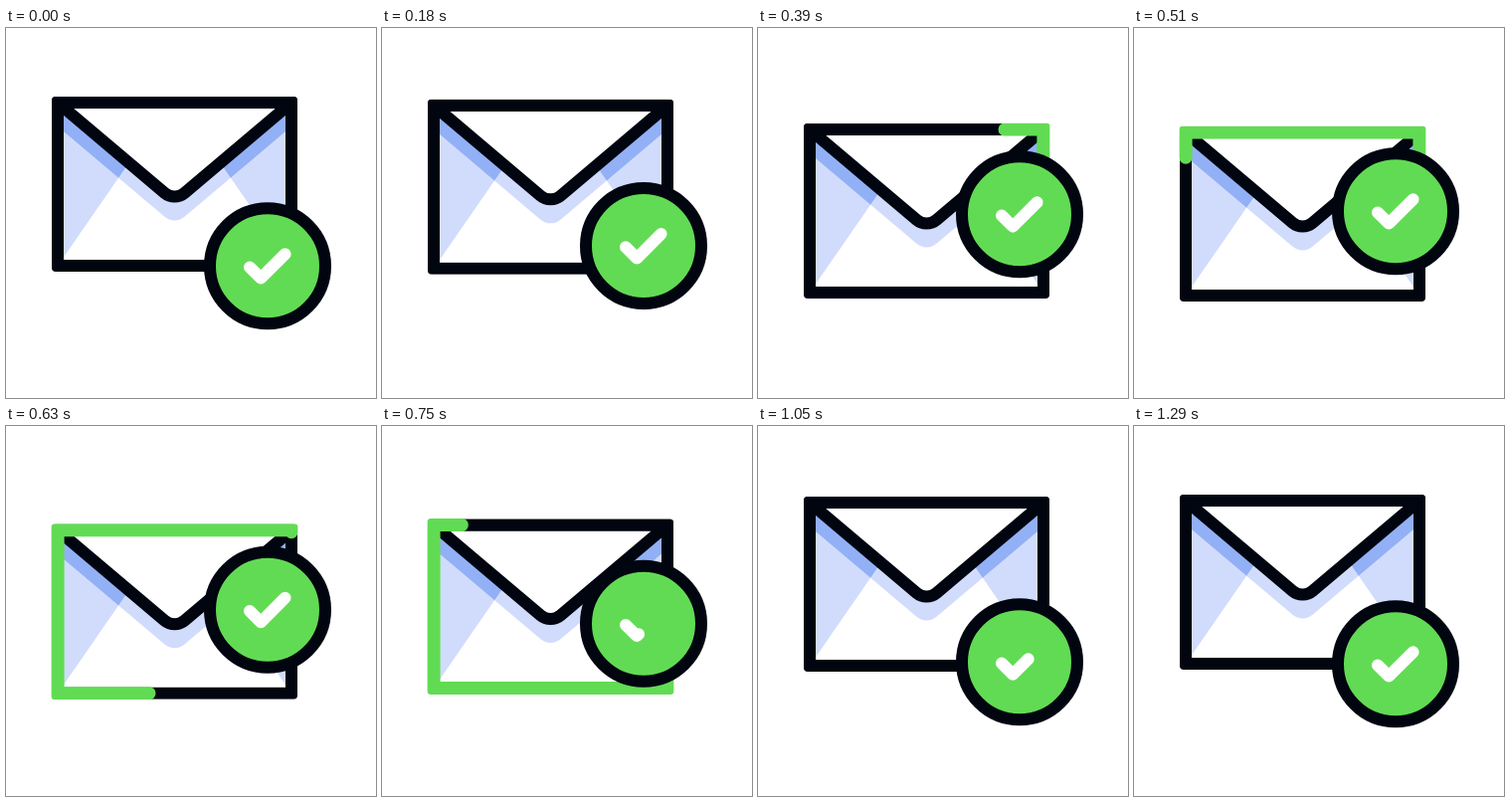
Animation of 372x372 px, one loop 1500 ms. Source, as an HTML page with a canvas:

```html
<!DOCTYPE html>
<html lang="en">
<head>
<meta charset="utf-8">
<title>Mail sent</title>
<style>
html, body { margin: 0; width: 100%; height: 100%; overflow: hidden; background: #fff; }
canvas { display: block; }
</style>
</head>
<body>
<canvas id="stage" width="372" height="372"></canvas>
<script>
const ctx = document.getElementById('stage').getContext('2d');
const LOOP = 1500, STEP = 30;
const INK = '#01050f', GREEN = '#62db54', PALE = '#d1dcfd', BLUE = '#92b0f6';
const LEFT = 52, RIGHT = 287, MID = 169.5, WIDTH = RIGHT - LEFT, HEIGHT = 164;
const PERIMETER = 2 * (WIDTH + HEIGHT);

const smooth = s => s * s * (3 - 2 * s);
const phase = (t, from, to) => Math.min(1, Math.max(0, (t - from) / (to - from)));

// Cubic bezier easing with handles (x1, 0) and (x2, 1)
function ease(p, x1, x2) {
  let lo = 0, hi = 1;
  for (let i = 0; i < 24; i++) {
    const s = (lo + hi) / 2, r = 1 - s;
    if (3 * s * r * r * x1 + 3 * s * s * r * x2 + s * s * s < p) lo = s;
    else hi = s;
  }
  return smooth(lo);
}

function flapPath(dy) {
  ctx.beginPath();
  ctx.moveTo(LEFT, 0);
  ctx.lineTo(LEFT, dy);
  ctx.arcTo(MID, 99.3 + dy, RIGHT, dy, 15.5);
  ctx.lineTo(RIGHT, dy);
  ctx.lineTo(RIGHT, 0);
  ctx.closePath();
}

function sidesPath() {
  ctx.beginPath();
  for (const [x, inner] of [[LEFT, 125], [RIGHT, 214]]) {
    ctx.moveTo(x, 0);
    ctx.lineTo(inner, 58.5);
    ctx.lineTo(x, HEIGHT);
    ctx.closePath();
  }
}

function fill(color) {
  ctx.fillStyle = color;
  ctx.fill();
}

function stroke(color, width) {
  ctx.strokeStyle = color;
  ctx.lineWidth = width;
  ctx.stroke();
}

function clipRounded(grow) {
  ctx.beginPath();
  ctx.roundRect(LEFT - grow, -grow, WIDTH + 2 * grow, HEIGHT + 2 * grow, 4);
  ctx.clip();
}

function drawEnvelope(y, head, tail) {
  ctx.save();
  ctx.translate(0, y);
  ctx.save();
  clipRounded(6);
  sidesPath();
  fill(PALE);
  flapPath(24);
  fill(PALE);
  ctx.save();
  sidesPath();
  ctx.clip();
  flapPath(24);
  fill(BLUE);
  ctx.restore();
  flapPath(0);
  fill('#fff');
  stroke(INK, 12);
  ctx.strokeRect(LEFT, 0, WIDTH, HEIGHT);
  ctx.restore();

  if (head - tail > 0.001) {
    clipRounded(6.6);
    ctx.lineCap = 'round';
    ctx.setLineDash([(head - tail) * PERIMETER, 2 * PERIMETER]);
    ctx.lineDashOffset = -tail * PERIMETER;
    ctx.beginPath();
    ctx.moveTo(RIGHT, 109);
    ctx.lineTo(RIGHT, 0);
    ctx.lineTo(LEFT, 0);
    ctx.lineTo(LEFT, HEIGHT);
    ctx.lineTo(RIGHT, HEIGHT);
    ctx.lineTo(RIGHT, 109);
    stroke(GREEN, 13.2);
  }
  ctx.restore();
}

function drawBadge(y, drawn) {
  ctx.save();
  ctx.translate(263, y);
  ctx.beginPath();
  ctx.arc(0, 0, 58, 0, 2 * Math.PI);
  fill(GREEN);
  stroke(INK, 12);
  if (drawn > 0.001) {
    ctx.lineCap = ctx.lineJoin = 'round';
    ctx.setLineDash([drawn * 50.6, 200]);
    ctx.beginPath();
    ctx.moveTo(-18, 1.2);
    ctx.lineTo(-6.8, 12.4);
    ctx.lineTo(17.6, -12);
    stroke('#fff', 12);
  }
  ctx.restore();
}

function render(time) {
  const t = Math.floor((time % LOOP) / STEP) * STEP;
  const out = phase(t, 60, 500), back = phase(t, 600, 1150);
  const drop = 30 * (ease(out, 0.6, 0.46) - ease(back, 0.36, 0.59));
  const lift = 55 * (ease(out, 0.24, 0.34) - ease(back, 0.32, 0.41));
  const head = smooth(phase(t, 225, 825));
  const tail = smooth(phase(t, 492, 1092));
  const check = t < 840 ? 1 - smooth(phase(t, 620, 840)) : smooth(phase(t, 840, 1153));

  ctx.fillStyle = '#fff';
  ctx.fillRect(0, 0, 372, 372);
  drawEnvelope(75 + drop, head, tail);
  drawBadge(239.2 - lift, check);
}

function tick() {
  render(performance.now());
  requestAnimationFrame(tick);
}
tick();
</script>
</body>
</html>
```
